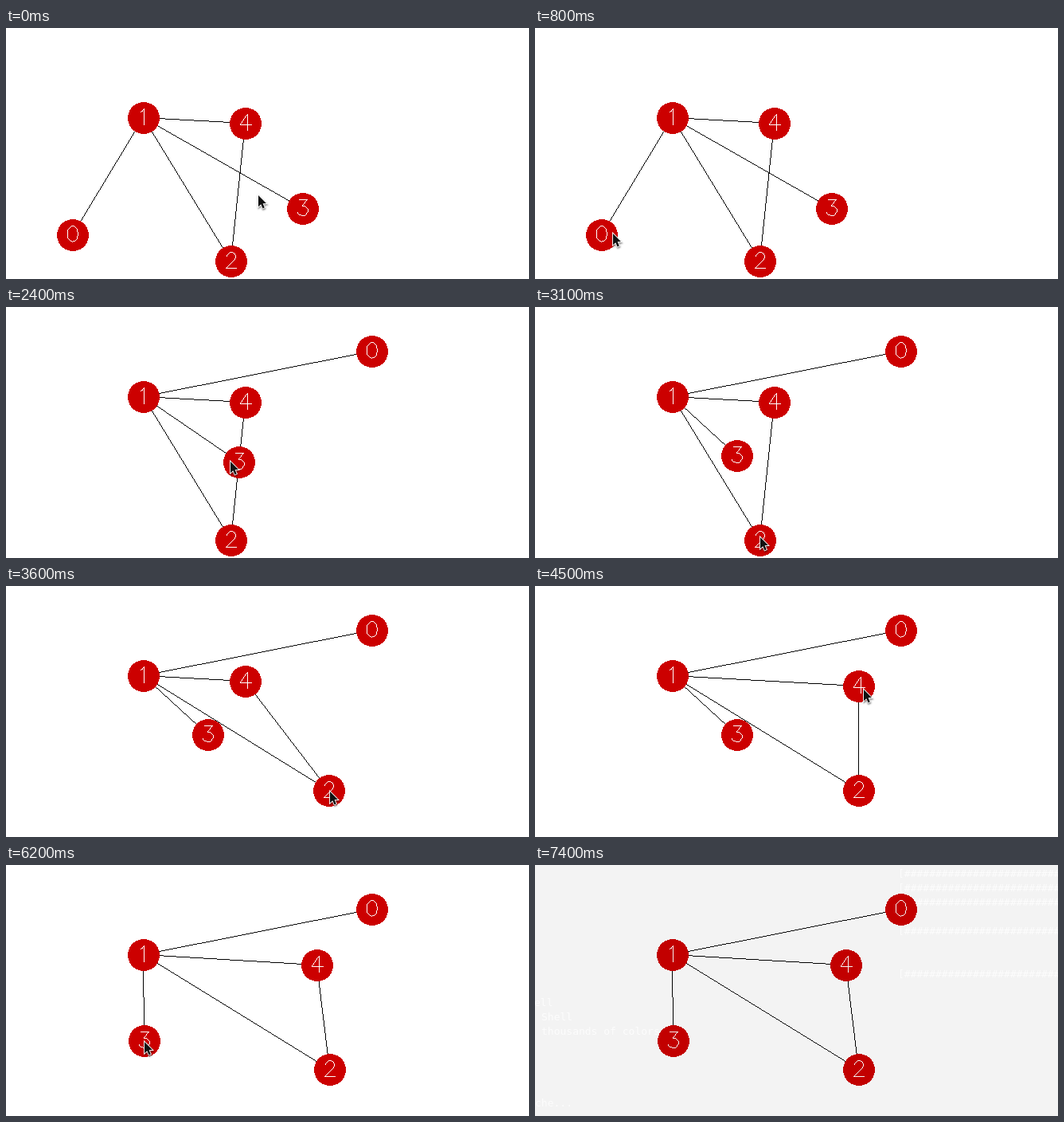
An HTML page with a canvas that plays this animation: 657x315 px, repeating every 7700 ms.

```html
<!DOCTYPE html>
<html lang="en">
<head>
<meta charset="utf-8">
<title>Draggable graph</title>
<style>
  html, body { margin: 0; width: 100%; height: 100%; overflow: hidden; background: #fff; }
  canvas { display: block; }
</style>
</head>
<body>
<canvas id="stage" width="657" height="315"></canvas>
<script>
const ctx = document.getElementById('stage').getContext('2d');
const W = 657, H = 315, LOOP = 7700, STEP = 100;
const RADIUS = 19.95, DIGIT_SCALE = 0.94;

const home = [[84, 260], [173, 113], [283, 293], [373, 227], [301, 120]];
const edges = [[0, 1], [1, 4], [1, 2], [1, 3], [2, 4]];

// Pointer gestures: eased from the previous place to x, y; times in steps.
const rest = [317, 209];
const gestures = [
  { from: 2, to: 8, x: 98, y: 257 },
  { from: 9, to: 12, x: 470, y: 54 },
  { from: 12, to: 13.3, x: 460, y: 56 },
  { from: 14, to: 17, x: 390, y: 234 },
  { from: 17, to: 23, x: 293, y: 195 },
  { from: 23, to: 25.8, x: 254, y: 187 },
  { from: 28, to: 31, x: 283, y: 288 },
  { from: 31, to: 35.2, x: 407, y: 257 },
  { from: 36, to: 40, x: 301, y: 118 },
  { from: 40, to: 44, x: 407, y: 126 },
  { from: 44, to: 45, x: 413, y: 129 },
  { from: 45, to: 46, x: 421, y: 119 },
  { from: 46, to: 47, x: 391, y: 126 },
  { from: 49, to: 54, x: 241, y: 190 },
  { from: 56, to: 57.55, x: 150, y: 218 },
  { from: 58, to: 61, x: 174, y: 221 },
  { from: 69, to: 73, x: 53, y: 1 }
];

// A dragged node trails the pointer by a short lag.
const drags = [
  { node: 0, from: 10, to: 15, lag: 1 },
  { node: 3, from: 19, to: 27, lag: 1 },
  { node: 2, from: 32, to: 37, lag: 1 },
  { node: 4, from: 41, to: 48, lag: 1 },
  { node: 3, from: 57, to: 62, lag: 0.345 }
];

// Polygonal arc, angles in degrees, y up.
function arc(cx, cy, rx, ry, a0, a1, n) {
  return Array.from({ length: n + 1 }, (_, i) => {
    const a = (a0 + (a1 - a0) * i / n) * Math.PI / 180;
    return [cx + rx * Math.cos(a), cy + ry * Math.sin(a)];
  });
}

// Single-stroke digits on a 20 x 21 cell above the baseline.
const digits = [
  arc(10, 10.5, 7, 10.5, 90, 450, 14),
  [[6, 17], [8, 18], [11, 21], [11, 0]],
  [...arc(10, 15, 6, 6, 170, -35, 8), [3, 0], [17, 0]],
  [[5, 21], [16, 21], [10, 13], ...arc(10, 6.5, 7, 6.5, 70, -155, 8)],
  [[13, 0], [13, 21], [3, 7], [18, 7]]
];

const arrow = [[0, 0], [0, 15.5], [3.6, 12.2], [6, 17.8], [8.5, 16.7], [6.1, 11.2], [10.8, 11]];

const ease = u => u * u * (3 - 2 * u);

function pointerAt(s) {
  let [x, y] = rest;
  for (const g of gestures) {
    if (s <= g.from) break;
    const u = ease(Math.min(1, (s - g.from) / (g.to - g.from)));
    x += (g.x - x) * u;
    y += (g.y - y) * u;
  }
  return [Math.round(x), Math.round(y)];
}

function nodesAt(s) {
  const pos = home.slice();
  for (const d of drags) {
    if (s >= d.from) pos[d.node] = pointerAt(Math.min(s, d.to) - d.lag);
  }
  return pos;
}

// Hard-edged one pixel line.
function line([x0, y0], [x1, y1]) {
  const n = Math.ceil(Math.max(Math.abs(x1 - x0), Math.abs(y1 - y0), 1));
  for (let i = 0; i <= n; i++) {
    const u = i / n;
    ctx.fillRect(Math.floor(x0 + (x1 - x0) * u), Math.floor(y0 + (y1 - y0) * u), 1, 1);
  }
}

function disc(cx, cy) {
  for (let y = -20; y < 20; y++) {
    const half = Math.round(Math.sqrt(Math.max(0, RADIUS ** 2 - (y + 0.5) ** 2)));
    ctx.fillRect(cx - half, cy + y, half * 2, 1);
  }
}

function digit(n, cx, cy) {
  const pts = digits[n].map(([x, y]) => [
    Math.round(cx - 10 + x * DIGIT_SCALE),
    Math.round(cy + 8 - y * DIGIT_SCALE)
  ]);
  for (let i = 1; i < pts.length; i++) line(pts[i - 1], pts[i]);
}

function drawGraph(pos, red, ink) {
  const mid = n => pos[n].map(v => v - 0.5);
  ctx.fillStyle = '#000';
  for (const [a, b] of edges) line(mid(a), mid(b));
  pos.forEach(([x, y], n) => {
    ctx.fillStyle = red;
    disc(x, y);
    ctx.fillStyle = ink;
    digit(n, x, y);
  });
}

function drawPointer(x, y) {
  ctx.save();
  ctx.translate(x, y + 1);
  ctx.scale(0.92, 0.92);
  ctx.beginPath();
  arrow.forEach(p => ctx.lineTo(...p));
  ctx.closePath();
  ctx.shadowColor = 'rgba(0,0,0,0.5)';
  ctx.shadowBlur = 2;
  ctx.shadowOffsetX = 0.5;
  ctx.shadowOffsetY = 1.5;
  ctx.lineWidth = 2;
  ctx.strokeStyle = '#fff';
  ctx.stroke();
  ctx.shadowColor = 'transparent';
  ctx.fillStyle = '#111';
  ctx.fill();
  ctx.restore();
}

// Terminal text shining faintly through the dimmed window.
function drawTerminal() {
  ctx.font = '13px "DejaVu Sans Mono", monospace';
  ctx.textBaseline = 'alphabetic';
  ctx.fillStyle = '#fcfcfc';
  for (const row of [0, 1, 2, 4, 7]) ctx.fillText('[' + '#'.repeat(26), 456, 15 + row * 18);
  ctx.fillText('ell', -1, 177);
  ctx.fillText('Shell', 8, 195);
  ctx.fillText('thousands of colors', 8, 213);
  ctx.fillText('che...', 0, 303);
}

function draw(ms) {
  const s = Math.floor((ms % LOOP) / STEP);
  const dim = s >= 74;
  ctx.fillStyle = dim ? '#f3f3f3' : '#fff';
  ctx.fillRect(0, 0, W, H);
  if (dim) drawTerminal();
  drawGraph(nodesAt(s), dim ? '#c20000' : '#cc0000', dim ? '#f3f3f3' : '#fff');
  if (!dim) drawPointer(...pointerAt(s));
}

const start = performance.now();
function tick() {
  draw(performance.now() - start);
  requestAnimationFrame(tick);
}
tick();
</script>
</body>
</html>
```
